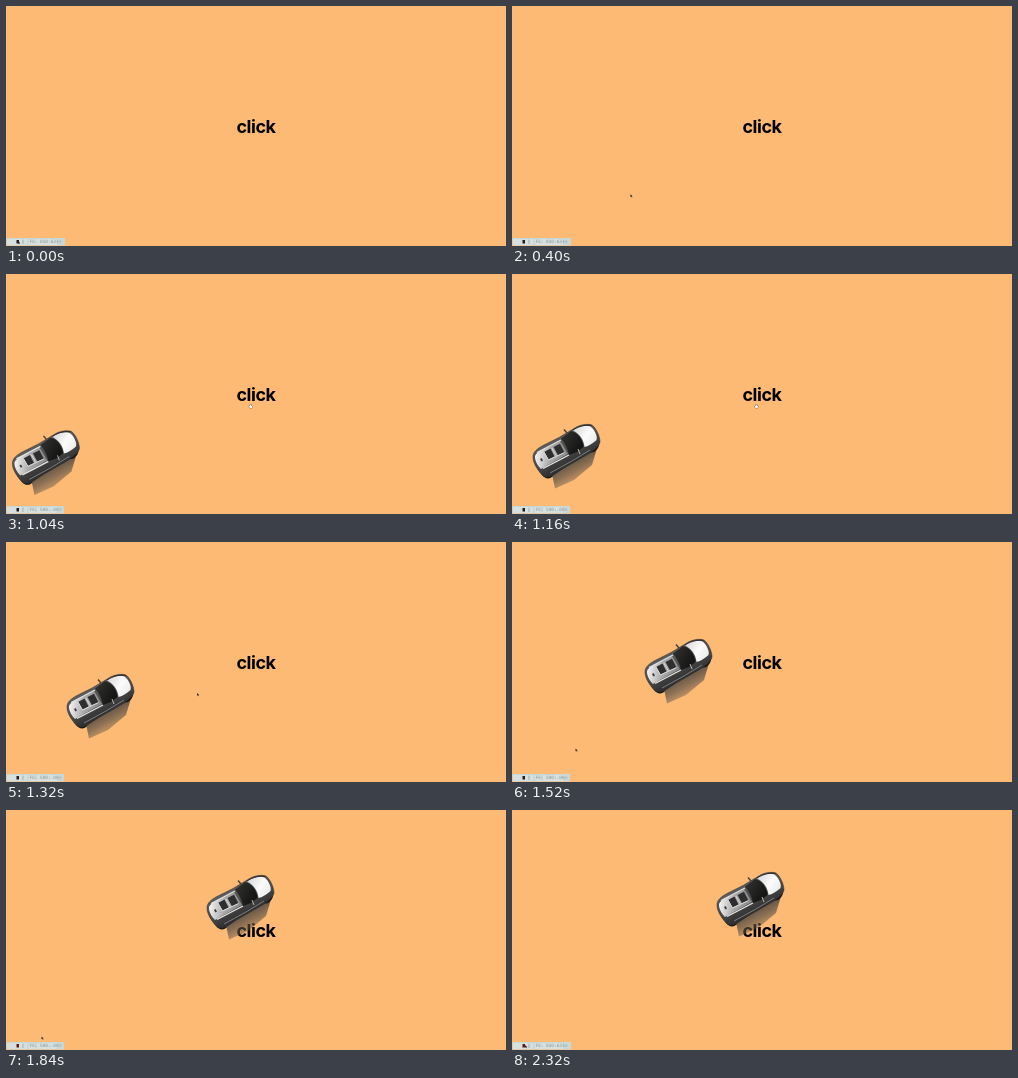
Recreate the animation shown at these times as an HTML page with a canvas. Size 500 by 240 pixels, loop 2.44 s.

```html
<!DOCTYPE html>
<html lang="en">
<head>
<meta charset="utf-8">
<title>click</title>
<style>
html, body { margin: 0; width: 100%; height: 100%; overflow: hidden; background: #fdba74; }
canvas { display: block; width: 500px; height: 240px; }
</style>
</head>
<body>
<canvas id="stage" width="500" height="240"></canvas>
<script>
const ctx = document.getElementById('stage').getContext('2d');
const LOOP = 2440, STEP = 40, CAR_IN = 1000;

// [time, x, y]; the car is an offset, the pointer a position
const carKeys = [[1000, -16, 7], [1160, 0, 0], [1320, 40, -18], [1520, 112, -53], [1840, 180, -85], [1960, 184, -88]];
const pointerKeys = [[160, 12, 235], [420, 128, 184], [680, 245, 131], [1200, 244, 131], [1320, 191, 151], [1520, 63.5, 206.5], [1840, 35.5, 226.5], [2200, 13, 235]];

// Smooth, non-overshooting curve through the keys
function slope(keys, i, c) {
  if (i === 0 || i === keys.length - 1) return 0;
  const rate = j => (keys[j + 1][c] - keys[j][c]) / (keys[j + 1][0] - keys[j][0]);
  const a = rate(i - 1), b = rate(i);
  return a * b > 0 ? 2 * a * b / (a + b) : 0;
}

function track(keys, t) {
  const last = keys.length - 1;
  if (t <= keys[0][0]) return keys[0].slice(1);
  if (t >= keys[last][0]) return keys[last].slice(1);
  let i = 0;
  while (t >= keys[i + 1][0]) i++;
  const span = keys[i + 1][0] - keys[i][0];
  const u = (t - keys[i][0]) / span, v = 1 - u;
  return [1, 2].map(c =>
    keys[i][c] * v * v * (1 + 2 * u) + keys[i + 1][c] * u * u * (3 - 2 * u) +
    span * (slope(keys, i, c) * u * v * v - slope(keys, i + 1, c) * u * u * v));
}

function fill(d, color) {
  ctx.fillStyle = color;
  ctx.fill(new Path2D(d));
}

function line(d, color, width) {
  ctx.strokeStyle = color;
  ctx.lineWidth = width;
  ctx.stroke(new Path2D(d));
}

function ramp(x0, y0, x1, y1, ...colors) {
  const g = ctx.createLinearGradient(x0, y0, x1, y1);
  colors.forEach((c, i) => g.addColorStop(i / (colors.length - 1), c));
  return g;
}

function drawCar(x, y) {
  ctx.save();
  ctx.translate(x, y);

  ctx.filter = 'blur(0.7px)';
  fill('M40 200L43 214.5L62 206L80 191L84.5 176L72 176Z',
    ramp(56, 188, 66, 207, 'rgba(66,62,58,.85)', 'rgba(84,76,68,.66)', 'rgba(120,98,78,.4)'));
  ctx.filter = 'none';

  // wheels and mirrors
  fill('M78 178C81 180 86 176 87 171L81 169ZM30 200C32 205 38 206 41 202L37 198Z', '#131313');
  line('M55 159L52 155.5', '#4a4138', 1.5);
  line('M67 177L68.5 180', '#d0d0d0', 1.2);

  // body
  const body = 'M21 183C21 178 25 175 30 172L47 163.5L62 154.5C68 150.5 75 149.5 80 151C84 154 88 162 88 168C87 173 82 176 78 179L52 194L40 202C36 204 32 203.5 30 201C25 195 21 189 21 183Z';
  fill(body, ramp(46, 165, 60, 192, '#5c5c5c', '#4b4b4b', '#2b2b2c'));
  line(body, '#262626', .5);

  // roof with bright rails and two glass panels
  fill('M23 183C23 180 26 178 30 176L48 167L56 180L36 191L29 195C26 192 23 187 23 183Z',
    ramp(24, 176, 54, 180, '#f4f4f4', '#a9a9a9', '#8c8c8c'));
  line('M25 178.5L49 166', '#e6e6e4', 1.2);
  line('M31 194.5L57 181', '#e6e6e4', 1.4);
  line('M34 196L58 183', '#3a3a3a', 1);
  fill('M32 178L38.5 174.5L42.5 182.5L36.5 185.5ZM41.5 173L48 169.8L52.5 178.5L46 181.2Z', '#2e2e30');
  line('M39.8 174L44.3 181.8M32 178L36.5 186L52.5 178.5', '#dededc', 1);
  fill('M28 185L29.6 184L31 186.5L29.4 187.4Z', '#3c3c3e');

  // windshield and side glass
  fill('M49 164.5L59 157C66 158 71 166 71.5 173L65 178L57 181C56 175 53 169 49 164.5Z',
    ramp(52, 164, 68, 174, '#2c2c2a', '#151514'));
  line('M38 199L60 187L78 176', '#858585', .9);
  line('M66 175L68 180', '#c7c7c7', .9);

  // hood
  fill('M61 156.5C67 152 74 151 78.5 152.5C82 155 86 162 84.5 166C81 169 77 172 72.5 173C72 166 67 159 61 156.5Z',
    ramp(64, 155, 84, 168, '#dedede', '#fbfbfb', '#ececec'));
  line('M61 156C67 152 74 150.5 79.5 151.5', '#222', .9);
  ctx.restore();
}

function drawBar(t) {
  const compact = t >= 1000 && t < 1960;
  const width = compact ? 58 : 59;
  ctx.fillStyle = '#c8d7d8';
  ctx.fillRect(.5, 232, width - .5, 7.5);
  ctx.fillStyle = '#d5e0df';
  ctx.fillRect(1, 233, 20, 6);
  ctx.fillRect(23, 233, 28, 6);

  ctx.fillStyle = '#8b999a';
  ctx.font = '4.4px "DejaVu Sans Mono", monospace';
  ctx.textAlign = 'left';
  ctx.fillText('‖', 16, 237.4);
  ctx.fillText(compact ? 'FE[ 500:.00' : 'FE: 850:633', 23.5, 237.4);
  ctx.fillText('×', 53, 237.4);

  const red = t >= 700 && t < 900 || t >= 1800;
  ctx.fillStyle = red ? '#6b1511' : '#251b1b';
  ctx.fillRect(10.5, 234, 2.5, 3.5);
}

function drawPointer(x, y, hand) {
  ctx.save();
  ctx.translate(x, y);
  if (hand) {
    const d = 'M-.5 -.5L.7 -.5L.7 .8L2 1.2L1.5 3L-.7 3L-1.6 1.3L-.5 1Z';
    line(d, '#6a6258', .8);
    fill(d, '#f5f0e8');
  } else {
    fill('M0 0L0 2.8L.8 2.3L1.4 3.3L1.9 3L1.4 2L2.2 1.9Z', '#2e2b2b');
  }
  ctx.restore();
}

function draw(t) {
  ctx.fillStyle = '#fdba74';
  ctx.fillRect(0, 0, 500, 240);
  ctx.fillStyle = '#000';
  ctx.font = '700 18px Inter, sans-serif';
  ctx.textAlign = 'center';
  ctx.letterSpacing = '-0.45px';
  ctx.fillText('click', 250, 127);
  ctx.letterSpacing = '0px';
  if (t >= CAR_IN) drawCar(...track(carKeys, t));
  drawBar(t);
  drawPointer(...track(pointerKeys, t), t >= 880 && t < 1240);
}

const start = performance.now();
function tick() {
  const t = (performance.now() - start) % LOOP;
  draw(Math.floor(t / STEP) * STEP);
  requestAnimationFrame(tick);
}
tick();
</script>
</body>
</html>
```
